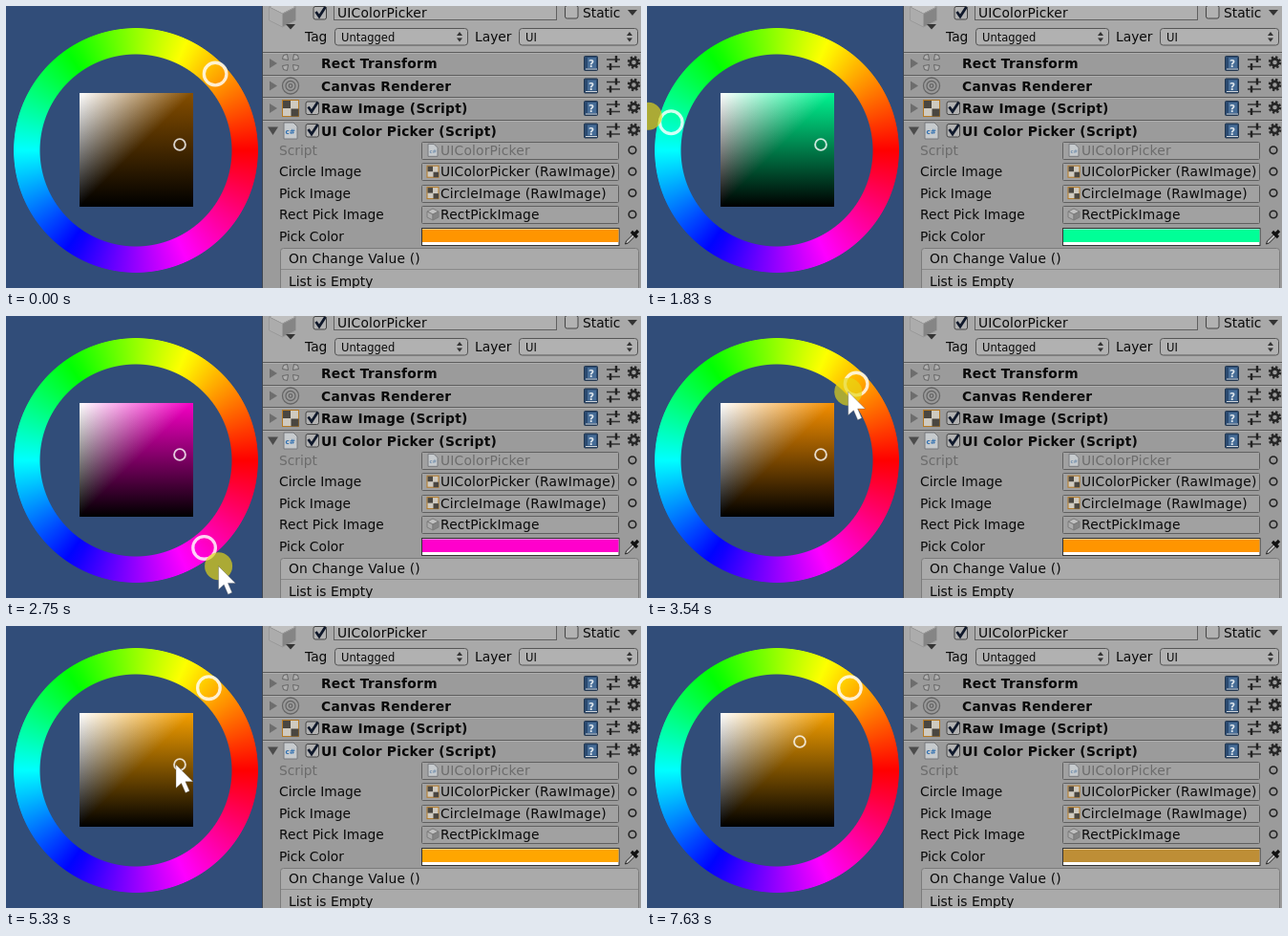
These frames come from a looping animation (665x295 px, 8.26 s). An HTML page with a canvas:

```html
<!DOCTYPE html>
<html lang="en">
<head>
<meta charset="utf-8">
<title>UI Color Picker</title>
<style>
html, body { margin: 0; width: 100%; height: 100%; overflow: hidden; background: #314d79; }
#stage { position: absolute; left: 0; top: 0; width: 665px; height: 295px; overflow: hidden; background: #314d79; }
#stage > * { position: absolute; }
svg { left: 0; top: 0; }
#wheel {
  left: 8.3px; top: 23.3px; width: 256px; height: 256px;
  -webkit-mask: radial-gradient(circle, transparent 100px, #000 101px, #000 127.5px, transparent 128.3px);
  mask: radial-gradient(circle, transparent 100px, #000 101px, #000 127.5px, transparent 128.3px);
}
#shade { left: 77px; top: 91px; }
text { font: 13.8px "DejaVu Sans", sans-serif; fill: #0a0a0a; white-space: pre; }
.b { font-weight: bold; letter-spacing: .25px; }
.v { letter-spacing: .2px; }
.s { font-size: 11.5px; }
.off { fill: #6b6b6b; }
</style>
</head>
<body>
<div id="stage">
  <div id="wheel"></div>
  <canvas id="shade" width="119" height="119"></canvas>
  <svg id="panel" width="665" height="295"></svg>
  <svg id="marks" width="665" height="295">
    <circle id="knob" r="11.8" fill="none" stroke="#fff" stroke-opacity=".82" stroke-width="3.3"/>
    <circle id="dot" r="5.9" fill="none" stroke="#fff" stroke-opacity=".8" stroke-width="1.9"/>
    <circle id="glow" r="14.5" fill="#e6d714" fill-opacity=".68"/>
    <path id="arrow" d="M0 0V24.5L5.6 19.4 10 29.5 14.2 27.6 9.9 17.8H17.8Z" fill="#fff" stroke="#555" stroke-opacity=".5" stroke-width=".7"/>
  </svg>
</div>
<script>
const $ = id => document.getElementById(id);

// ---- inspector panel ----
const rect = (x, y, w, h, fill, stroke = 'none', r = 0) =>
  `<rect x="${x}" y="${y}" width="${w}" height="${h}" rx="${r}" fill="${fill}" stroke="${stroke}"/>`;
const path = (d, fill, stroke = 'none', w = 1) =>
  `<path d="${d}" fill="${fill}" stroke="${stroke}" stroke-width="${w}"/>`;
const ring = (x, y, r, stroke, w = 1.3) =>
  `<circle cx="${x}" cy="${y}" r="${r}" fill="none" stroke="${stroke}" stroke-width="${w}"/>`;
const label = (x, y, s, c = '') => `<text x="${x}" y="${y}" class="${c}">${s}</text>`;
const group = (x, y, s) => `<g transform="translate(${x} ${y})">${s}</g>`;

const box = (x, y, on) => rect(x + .5, y + .5, 13.5, 13.5, '#b2b2b2', '#444', 2) +
  (on ? path(`M${x + 3} ${y + 6}l3.5 5 6.5-10`, 'none', '#10192b', 2.8) : '');
const cube = (x, y, s, line) => group(x, y,
  path(`M0 ${-s}L${s} ${-s / 2}L0 0L${-s} ${-s / 2}Z`, '#c0c0c0', line) +
  path(`M${-s} ${-s / 2}L0 0V${s}L${-s} ${s / 2}Z`, '#acacac', line) +
  path(`M${s} ${-s / 2}L0 0V${s}L${s} ${s / 2}Z`, '#858585', line));
const checker = (x, y, s) => rect(x, y, s, s, '#cfcac0', '#b57a25') +
  [0, s / 2].map(d => rect(x + d + .5, y + d + .5, s / 2 - .5, s / 2 - .5, '#4a4640')).join('');
const page = (x, y, w, h, ink) => path(`M${x} ${y}h${w - 4}l4 4v${h - 4}h${-w}Z`, '#c6cacd', '#77797c') +
  `<text x="${x + 1.5}" y="${y + h * .72}" style="font-size:${w * .52}px;font-weight:bold;fill:${ink}">c#</text>`;
const popup = (x, w, s) => rect(x + .5, 23.5, w, 17.5, '#b1b1b1', '#555', 3) + label(x + 7, 36.5, s, 's') +
  path(`M${x + w - 11} 31l3-4 3 4zm0 2.5l3 4 3-4z`, '#333');
const tools = y => rect(605.5, y - 7.5, 14, 15, '#2b4a70', '#22364f', 1) + rect(609, y - 6, 9, 11, '#476d97') +
  `<text x="610" y="${y + 4}" style="font-size:10.5px;font-weight:bold;fill:#dfe6ec">?</text>` +
  path(`M607 ${y + 6}h12`, 'none', '#cfd5da') +
  path(`M629 ${y - 4}h14M629 ${y + 3.5}h14`, 'none', '#333', 1.5) +
  path(`M639 ${y - 8}v7M633 ${y}v7`, 'none', '#222', 2.4) +
  group(657.5, y - 1, `<circle r="5.4" fill="none" stroke="#262626" stroke-width="2.6" stroke-dasharray="2.2 2.04"/>` +
    ring(0, 0, 3.6, '#262626', 2.6));
const petals = [0, 90, 180, 270].map(a =>
  `<path transform="rotate(${a})" d="M2.5 2.5l6 1-1 4-4 1z" fill="#b0b0b0" stroke="#666"/>`).join('');
const fold = (y, open) => path(open ? `M274 ${y - 4}h11l-5.5 8.5z` : `M276 ${y - 5}v10l8-5z`, open ? '#4b4b4b' : '#6d6d6d');

const headers = ['Rect Transform', 'Canvas Renderer', 'Raw Image (Script)', 'UI Color Picker (Script)'].map((s, i) => {
  const y = 60 + 23.5 * i, top = Math.ceil(y - 12);
  return rect(269, top, 396, 1, '#5c5c5c') + rect(269, top + 1, 396, 1, '#adadad') +
    fold(y, i === 3) + label(330, y + 5, s, 'b') + tools(y) + (i > 1 ? box(313.5, y - 7.5, true) : '');
});
const fields = [
  ['Script', 'UIColorPicker', y => page(442, y - 6.5, 10, 13, '#7590ad')],
  ['Circle Image', 'UIColorPicker (RawImage)', y => checker(441, y - 6, 12)],
  ['Pick Image', 'CircleImage (RawImage)', y => checker(441, y - 6, 12)],
  ['Rect Pick Image', 'RectPickImage', y => cube(447, y, 6, '#7c7c7c')]
].map(([name, value, icon], i) => {
  const y = 150.8 + 22.4 * i, c = i ? '' : ' off';
  return label(286, y + 5, name, c) + rect(435.5, Math.round(y) - 8.5, 206, 18, '#a1a1a1', '#606060', 1) +
    icon(y) + label(455, y + 5, value, 'v' + c) + ring(656, y, 3.8, '#222', 1.6);
});

$('panel').innerHTML =
  rect(269, 0, 396, 295, '#9b9b9b') + rect(269, 0, 396, 48, '#a9a9a9') + rect(268, 0, 1, 295, '#3c4450') +
  cube(289.5, 8, 14, '#9a9a9a') + path('M293 19h10l-5 5.5z', '#333') +
  box(321.5, 0, true) + rect(343.5, -3.5, 233, 18, '#b0b0b0', '#606060') + label(347, 11.5, 'UIColorPicker', 'v') +
  box(585, -1, false) + label(604, 11.5, 'Static') + path('M651 4h10l-5 6z', '#333') +
  label(313, 37, 'Tag') + popup(344, 139, 'Untagged') + label(491, 37, 'Layer') + popup(537, 124, 'UI') +
  headers.join('') + fields.join('') +
  group(298, 59, petals) + [8.5, 5, 1.8].map(r => ring(298, 83.5, r, '#666')).join('') +
  checker(289.5, 98.5, 17) + page(291, 122, 14, 17, '#2f6fb0') +
  label(286, 246, 'Pick Color') + rect(435.5, 232.5, 206.5, 18, '#fff', '#333') +
  '<rect id="swatch" x="436" y="233.5" width="205.5" height="13.5"/>' +
  path('M648.5 249l1-3 7-7 2 2-7 7z', '#c4c4c4', '#222') + path('M655 236l6 6M658 239l4-4', 'none', '#111', 3.2) +
  rect(287.5, 253.5, 375, 50, '#aaa', '#7c7c7c', 3) + rect(288, 275, 374, 1, '#8a8a8a') +
  label(296, 269, 'On Change Value ()', 'v') + label(296, 293, 'List is Empty');

// ---- colours ----
const sin = a => Math.sin(a * Math.PI / 180);
const cos = a => Math.cos(a * Math.PI / 180);
const hsv = (h, s, v) => {
  const f = n => {
    const q = (n + h / 60 + 12) % 6;
    return Math.round(255 * v * (1 - s * Math.max(0, Math.min(q, 4 - q, 1))));
  };
  return `rgb(${f(5)},${f(3)},${f(1)})`;
};
const stops = Array.from({ length: 73 }, (_, i) => {
  const a = 360 - i * 5;
  return `${hsv(a - 5 * sin(a), 1, 1)} ${i * 5}deg`;
});
$('wheel').style.background = `conic-gradient(from 90deg, ${stops})`;

// Two triangles with corner colours: white, the hue, and black along the bottom.
const ctx = $('shade').getContext('2d');
const size = 119;
function blend(x0, y0, x1, y1, color) {
  const g = ctx.createLinearGradient(x0, y0, x1, y1);
  g.addColorStop(0, '#000');
  g.addColorStop(1, color);
  ctx.fillStyle = g;
}
function paintShade(color) {
  ctx.globalCompositeOperation = 'source-over';
  blend(0, size, 0, 0, color);
  ctx.fillRect(0, 0, size, size);
  blend(0, 0, size, 0, color);
  ctx.beginPath();
  ctx.moveTo(0, 0);
  ctx.lineTo(size, 0);
  ctx.lineTo(0, size);
  ctx.fill();
  ctx.globalCompositeOperation = 'lighter';
  blend(size / 2, size / 2, 0, 0, '#fff');
  ctx.fillRect(0, 0, size, size);
}

// ---- motion, in steps of 77 ms ----
const STEP = 77, LOOP = 8260;
const DRAG = 12, FREE = 64, PICK = 72, END = 99;
const turn = [[11, 44.3], [24, 165], [36, 308], [46, 404.3], [50, 422], [55, 422], [58, 408.9]];
const pick = [[71, 182, 145], [76, 158, 105], [81, 117, 142.5], [86, 126, 172], [92, 170, 160], [99, 160, 121]];

const mix = (p, q, u) => p.map((v, i) => v + (q[i] - v) * u);
const clamp = u => Math.max(0, Math.min(1, u));
const at = (track, k) => {
  const i = Math.max(1, track.findIndex(p => p[0] >= k) + 1 || track.length) - 1 || 1;
  const [p, q] = [track[i - 1], track[i]];
  return mix(p.slice(1), q.slice(1), clamp((k - p[0]) / (q[0] - p[0])));
};
const polar = (a, r) => [136.6 + r * cos(a), 151.6 - r * sin(a)];
const place = (id, [x, y], shown = true) => {
  $(id).setAttribute('transform', `translate(${x.toFixed(2)} ${y.toFixed(2)})`);
  $(id).style.display = shown ? '' : 'none';
};

function pointer(k, a, spot) {
  if (k < DRAG) return mix([215, 65], [455, 285], (1 - clamp((k - 1) / 10)) ** 2);
  if (k >= PICK) return spot;
  const held = polar(a, 131 - 28 * cos(a - 56));
  const u = clamp((k - FREE + 1) / 6);
  return mix(held, [178, 145], u * u * (3 - 2 * u));
}

function pose(k) {
  const [a] = at(turn, k);
  const hue = (a - 4.7 - 9.4 * sin(a - 15.5)) % 360;
  const spot = at(pick, k);
  const tip = pointer(k, a, spot);
  const seen = k > 0 && k < END;
  place('knob', polar(a, 115.3));
  place('dot', spot);
  place('glow', tip, seen && k >= DRAG - 1 && (k < FREE || k >= PICK));
  place('arrow', tip, seen && tip[0] > 3);
  paintShade(hsv(hue, 1, k < DRAG ? .52 : .96));
  $('swatch').setAttribute('fill',
    k < PICK ? hsv(hue, 1, 1) : hsv(hue, .16 + .8 * (spot[0] - 77) / size, .745));
}

let last = -1;
const start = performance.now();
function tick() {
  const k = Math.floor(((performance.now() - start) % LOOP + 25) / STEP);
  if (k !== last) pose(last = k);
  requestAnimationFrame(tick);
}
tick();
</script>
</body>
</html>
```
